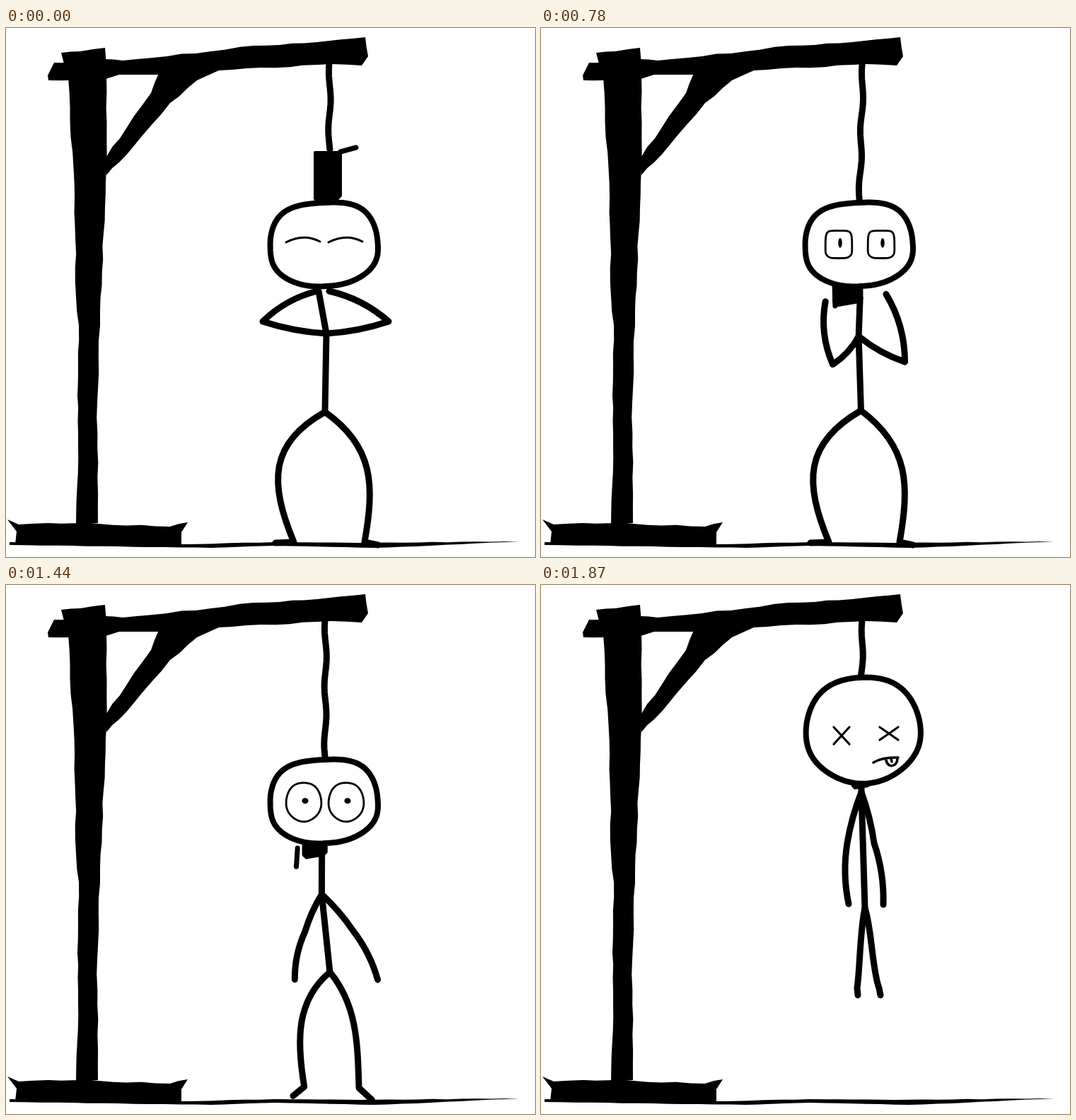
An HTML page with a canvas that plays this animation: 748 by 748 pixels, repeating every 1900 ms.

```html
<!DOCTYPE html>
<html>
<head>
<meta charset="utf-8">
<style>
html, body { margin: 0; width: 100%; height: 100%; overflow: hidden; background: #fff; }
canvas { display: block; }
</style>
</head>
<body>
<canvas id="stage" width="748" height="748"></canvas>
<script>
const ctx = document.getElementById('stage').getContext('2d');
const LOOP = 1900, DROP = 1600, SNAP = 1690, END = 1870;

// The drawings are held for 30 or 70 ms
const holds = [...'73373777333373333333733773333777733333333333333'].map(d => d * 10);

let seed = 7;
const jitter = size => {
  seed = seed * 16807 % 2147483647;
  return (seed / 2147483647 - .5) * 2 * size;
};

// Filled shape with hand-cut edges
function rough(corners, size = 1) {
  const p = corners.split(',').map(c => c.split(' ').map(Number));
  const path = new Path2D();
  p.forEach(([x, y], i) => {
    const [x2, y2] = p[(i + 1) % p.length];
    const n = Math.ceil(Math.hypot(x2 - x, y2 - y) / 22);
    path.lineTo(x, y);
    for (let k = 1; k < n; k++)
      path.lineTo(x + (x2 - x) * k / n + jitter(size), y + (y2 - y) * k / n + jitter(size));
  });
  path.closePath();
  return path;
}

const gallows = [
  rough('88 70,142 68,142 200,138 290,133 400,129 530,130 700,99 704,102 590,101 520,103 420,99 380,97 240'),
  rough('78 35,105 33,140 28,144 70,88 74'),
  rough('68 49,90 48,90 74,60 74,59 67'),
  rough('140 44,165 46,290 33,350 25,440 20,508 13,512 40,503 53,460 51,300 60,220 66,160 66,141 72'),
  rough('216 64,310 56,270 74,232 106,192 153,160 190,142 208,142 182,170 142,205 92'),
  rough('2 695,18 702,60 700,130 701,232 705,257 699,248 713,248 732,13 730,15 712'),
  rough('5 727,250 730,380 727,500 728,726 726,600 732,520 735,380 732,290 735,5 731', .3)
];

// Key poses. knot: x, top, bottom, half width; arms: elbow, hand; legs: knee, ankle, toe;
// head: centre, radii, squareness; eye: y, radii, squareness; pupil: y, radii
const poses = {
  0: {
    rope: [458, 457], knot: [455, 176, 246, 18], tail: [473, 175, 495, 169],
    neck: [442, 372], shoulder: [453, 432], hip: [451, 543],
    armL: [363, 415, 440, 372], armR: [541, 415, 457, 372], bow: [12],
    eye: [300, 20, 5, 2], pupil: [290, 0, 0]
  },
  200: {
    rope: [458, 454], knot: [454, 196, 246, 19], tail: [472, 195, 488, 178],
    neck: [446, 372], shoulder: [450, 433], hip: [453, 542],
    armL: [394, 463, 433, 371], armR: [526, 464, 443, 371], bow: [16],
    eye: [296, 19, 25, 2.1], pupil: [284, 4, 4]
  },
  560: {
    rope: [459, 452], knot: [437, 330, 381, 10], tail: [430, 340, 432, 350],
    neck: [449, 372], shoulder: [447, 435], hip: [453, 541],
    armL: [412, 473, 429, 377], armR: [514, 470, 452, 371], bow: [17],
    eye: [300, 15, 28, 2.5], pupil: [298, .6, 10]
  },
  970: {
    rope: [452, 449], knot: [431, 366, 402, 28], tail: [402, 380, 402, 430],
    neck: [453, 390], shoulder: [451, 437], hip: [452, 541],
    armL: [413, 478, 379, 395], armR: [515, 474, 519, 381], bow: [11],
    eye: [311, 22, 12, 6], pupil: [309, 4.5, 4]
  },
  1150: { armL: [393, 463, 337, 440], armR: [517, 466, 576, 440], bow: [5] },
  1230: {
    rope: [452, 449], knot: [431, 366, 402, 28], tail: [402, 380, 402, 430],
    neck: [454, 390], shoulder: [447, 443], hip: [454, 544],
    armL: [417, 495, 397, 560], armR: [492, 498, 533, 561], bow: [-7],
    legL: [372, 615, 407, 727, 381, 728], legR: [521, 620, 507, 727, 526, 731],
    eye: [308, 22, 28, 2.2], pupil: [308, 4.5, 3.5]
  },
  [DROP]: {
    rope: [452, 453], knot: [441, 362, 373, 7], tail: [420, 366, 417, 374],
    neck: [441, 372], shoulder: [446, 433], hip: [461, 550],
    armL: [427, 487, 417, 556], armR: [490, 482, 520, 556], bow: [-8],
    legL: [440, 615, 433, 696, 425, 718], legR: [479, 625, 493, 699, 511, 726],
    head: [449.5, 305.5, 76, 59, 2.5], eye: [306, 27, 27, 2], pupil: [303, 4.5, 4.5]
  },
  [SNAP]: {
    rope: [455, 453], knot: [453, 276, 287, 12], tail: [453, 276, 453, 282],
    neck: [453, 285], shoulder: [453, 293], hip: [458, 457],
    armL: [433, 365, 435, 451], armR: [471, 365, 484, 452], bow: [-8],
    legL: [451, 515, 447, 570, 448, 580], legR: [468, 515, 478, 570, 480, 580],
    head: [455.5, 205, 81, 75, 2.1]
  }
};

function pose(part, t) {
  const times = Object.keys(poses).map(Number).filter(k => poses[k][part]);
  const next = times.find(k => k > t) ?? times.at(-1);
  const prev = times.findLast(k => k <= t) ?? next;
  const a = poses[prev][part], b = poses[next][part];
  const u = next === prev ? 0 : (t - prev) / (next - prev);
  return a.map((v, i) => v + (b[i] - v) * u);
}

// Drop of the body, rising to 1 at the snap and then swinging out
function swing(t) {
  if (t < SNAP) return Math.max(0, (t - DROP) / (SNAP - DROP));
  const u = (t - SNAP) / (END - SNAP);
  return (1 - u) * Math.cos(4.7 * u);
}

function stroke(path, width) {
  ctx.lineWidth = width;
  ctx.stroke(path);
}

// Superellipse with a slightly unsteady outline
function blob(cx, cy, rx, ry, power = 2, tilt = 0) {
  const path = new Path2D(), bend = v => Math.sign(v) * Math.abs(v) ** (2 / power);
  for (let a = 0; a < 2 * Math.PI; a += .05) {
    const wobble = 1 + .01 * Math.sin(5 * a);
    const x = rx * bend(Math.cos(a)) * wobble, y = ry * bend(Math.sin(a)) * wobble;
    path.lineTo(cx + x * Math.cos(tilt) - y * Math.sin(tilt), cy + x * Math.sin(tilt) + y * Math.cos(tilt));
  }
  path.closePath();
  return path;
}

function drawRope(t, dx, dy) {
  const [x0, x1] = pose('rope', t), [, cy, , ry] = pose('head', t);
  const end = Math.min(pose('knot', t)[1], cy - ry) + dy, path = new Path2D();
  for (let y = 52; y < end; y += 4) {
    const u = (y - 52) / (end - 52);
    path.lineTo(x0 + (x1 + dx - x0) * u + 1.5 * Math.sin(y / 13), y);
  }
  stroke(path, 9);
}

function drawKnot(t) {
  const [x, top, bottom, half] = pose('knot', t);
  const l = x - half, r = x + half, slant = half / 4;
  const path = new Path2D(`M${l} ${top}H${r}V${bottom - 2 * slant}L${r - slant} ${bottom - slant}L${l + slant} ${bottom}L${l} ${bottom - slant}Z`);
  ctx.fill(path);
  stroke(path, 4);
  const [a, b, c, d] = pose('tail', t);
  stroke(new Path2D(`M${a} ${b}L${c} ${d}`), 7);
}

function drawArm(t, part, side) {
  const [sx, sy] = pose('shoulder', t), [ex, ey, hx, hy] = pose(part, t);
  const bow = pose('bow', t)[0] * side;
  const bent = (x, y, x2, y2, size) => {
    const k = size / Math.hypot(x2 - x, y2 - y);
    return `Q${(x + x2) / 2 + (y2 - y) * k} ${(y + y2) / 2 - (x2 - x) * k} ${x2} ${y2}`;
  };
  stroke(new Path2D(`M${sx} ${sy}` + bent(sx, sy, ex, ey, bow / 2) + bent(ex, ey, hx, hy, bow)), 9);
}

function drawLeg(t, part) {
  const [kx, ky, ax, ay, tx, ty] = pose(part, t);
  stroke(new Path2D(`M${pose('hip', t)}C${kx} ${ky - 28} ${kx} ${ky + 28} ${ax} ${ay}L${tx} ${ty}`), 9);
}

function drawEyes(t) {
  const [y, rx, ry, power] = pose('eye', t), [py, w, h] = pose('pupil', t);
  for (const x of [421, 481]) {
    if (t < 70) {
      stroke(new Path2D(`M${x - 25} 303Q${x} 290 ${x + 23} 302`), 3);
      continue;
    }
    stroke(blob(x, y, rx, ry, power), 2.8);
    ctx.fill(blob(x + 2, py, w, h));
  }
}

function drawDeadFace() {
  for (const [x, y, w, h] of [[425, 213, 11, 12], [492, 210, 13, 9]])
    stroke(new Path2D(`M${x - w} ${y - h}L${x + w} ${y + h}M${x + w} ${y - h}L${x - w} ${y + h}`), 3.2);
  stroke(new Path2D('M470 251Q483 243 505 244M488 246C488 259 504 259 504 245M495 245L496 250'), 3.5);
}

function draw(t) {
  ctx.fillStyle = '#fff';
  ctx.fillRect(0, 0, 748, 748);
  ctx.fillStyle = ctx.strokeStyle = '#000';
  ctx.lineCap = ctx.lineJoin = 'round';
  gallows.forEach(part => ctx.fill(part));

  const dx = -5 * swing(t), dy = 45 * swing(t);
  drawRope(t, dx, dy);
  ctx.save();
  ctx.translate(dx, dy);
  drawKnot(t);

  const [cx, cy, rx, ry, power] = pose('head', t);
  const head = blob(cx, cy, rx, ry, power, -.06);
  ctx.fillStyle = '#fff';
  ctx.fill(head);
  ctx.fillStyle = '#000';
  stroke(head, 8);

  const [neck, shoulder, hip] = ['neck', 'shoulder', 'hip'].map(part => pose(part, t));
  stroke(new Path2D(`M${neck}L${shoulder}L${hip}`), 9);
  drawArm(t, 'armL', 1);
  drawArm(t, 'armR', -1);
  drawLeg(t, 'legL');
  drawLeg(t, 'legR');

  if (t < SNAP) {
    ctx.translate(0, cy - 305.5);
    drawEyes(t);
  } else {
    drawDeadFace();
  }
  ctx.restore();
}

function frame(now) {
  const t = now % LOOP;
  let start = 0;
  for (const hold of holds) {
    if (start + hold > t) break;
    start += hold;
  }
  draw(Math.min(start, END));
  requestAnimationFrame(frame);
}
requestAnimationFrame(frame);
</script>
</body>
</html>
```
